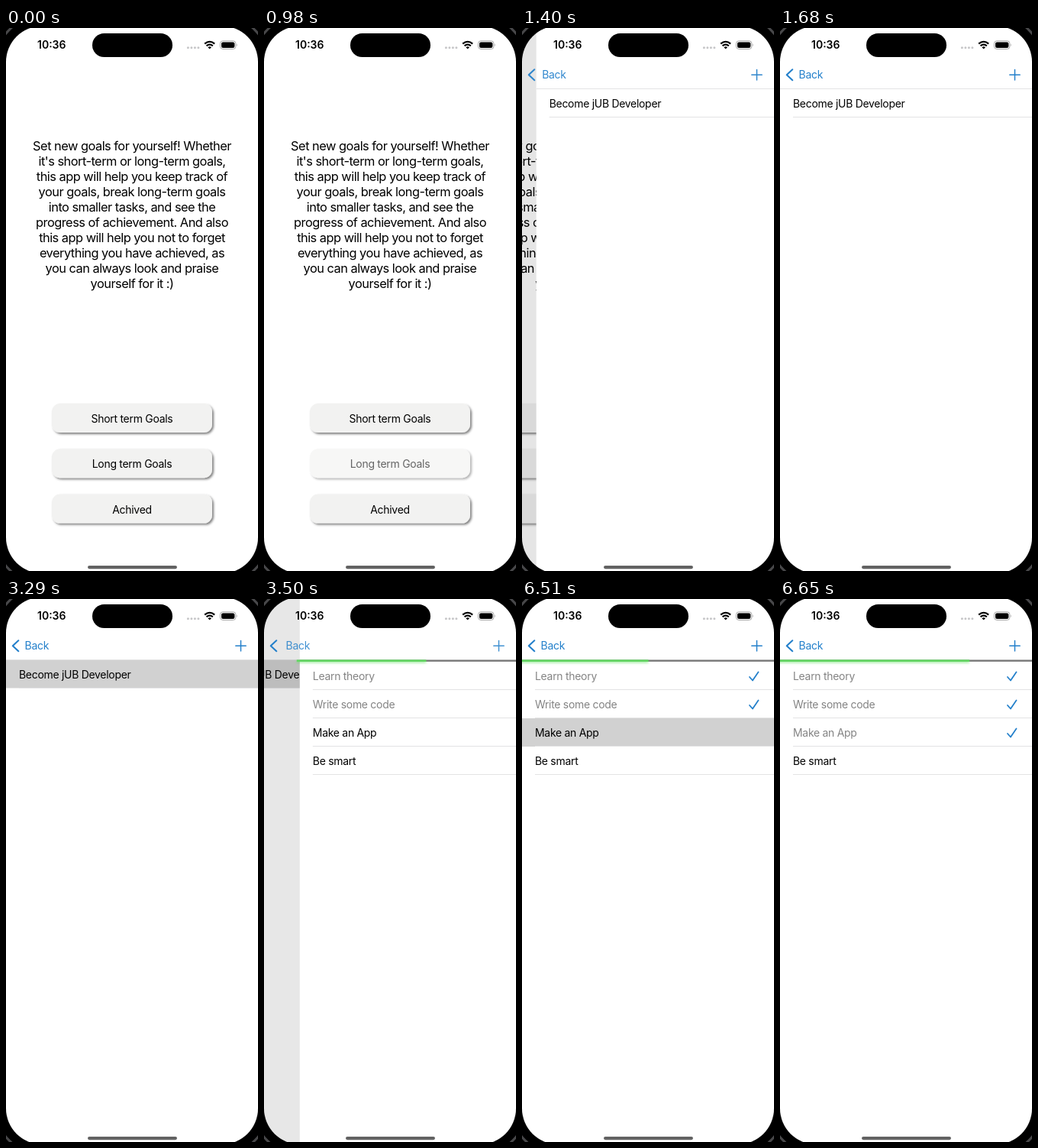
Write an HTML page that moves like this. It is 330 px wide and 710 px high and loops after 8 s.

```html
<!DOCTYPE html>
<html lang="en">
<head>
<meta charset="utf-8">
<title>Goals app</title>
<style>
html, body { margin: 0; width: 100%; height: 100%; overflow: hidden; background: #000; }
svg { display: block; width: 330px; height: 710px; }
text { font: 400 14px Inter, "Liberation Sans", sans-serif; letter-spacing: -0.3px; fill: #000; }
.intro text { font-size: 16.4px; letter-spacing: -0.52px; text-anchor: middle; }
.button text { text-anchor: middle; }
.button rect { fill: #f2f2f1; filter: url(#shadow); }
.clock { font-weight: 600; letter-spacing: 0; }
.done { fill: #848484; }
.back { fill: #2480cb; }
.icon { fill: none; stroke: #2480cb; stroke-linecap: round; stroke-linejoin: round; }
.line { stroke: #e3e3e4; stroke-width: 1; }
.press { fill: #d1d1d1; }
</style>
</head>
<body>
<svg viewBox="0 0 330 710">
  <defs>
    <filter id="shadow" x="-5%" y="-20%" width="110%" height="150%">
      <feDropShadow dx="2" dy="2" stdDeviation="1.7" flood-color="#000" flood-opacity=".5"/>
    </filter>
    <filter id="glow" x="-5%" y="-200%" width="110%" height="600%">
      <feDropShadow dx="0" dy="1.5" stdDeviation="1.5" flood-color="#5fe05f" flood-opacity=".7"/>
    </filter>
    <clipPath id="screen"><rect y="-2.5" width="330" height="715.5" rx="47"/></clipPath>
  </defs>

  <rect width="330" height="710" fill="#000"/>
  <rect x="-13" y="-15.5" width="356" height="741.5" rx="60" fill="none" stroke="#48484a" stroke-width="3"/>

  <g clip-path="url(#screen)">
    <g id="home">
      <rect y="-3" width="330" height="717" fill="#fff"/>
      <g class="intro" id="intro"></g>
      <g id="buttons"></g>
      <rect class="dim" y="-3" width="330" height="717" opacity="0"/>
    </g>

    <g id="goals">
      <rect y="-3" width="330" height="717" fill="#fff"/>
      <rect class="press" id="goalPress" y="79.5" width="330" height="37"/>
      <path class="line" d="M0 79.5H330M17 116.5H330"/>
      <text x="17" y="103.5">Become jUB Developer</text>
      <rect class="dim" y="-3" width="330" height="717" opacity="0"/>
    </g>

    <g id="tasks">
      <rect y="-3" width="330" height="717" fill="#fff"/>
      <rect class="press" id="taskPress" y="156" width="330" height="37"/>
      <g id="rows"></g>
      <rect y="79.5" width="330" height="2.4" fill="#787878"/>
      <rect id="bar" x="-4" y="79.5" height="2.4" fill="#5fd85f" filter="url(#glow)"/>
    </g>

    <path class="icon" id="chevron" d="M16.3 54.3L8.8 61.2L16.3 68.2" stroke-width="2.1"/>
    <g id="nav1"></g>
    <g id="nav2"></g>

    <text class="clock" x="41" y="27.3">10:36</text>
    <rect x="113" y="7" width="105" height="31" rx="15.5"/>
    <g fill="#c6c6c8">
      <circle cx="238.4" cy="25.7" r="1.5"/><circle cx="242.9" cy="25.7" r="1.5"/>
      <circle cx="247.4" cy="25.7" r="1.5"/><circle cx="251.9" cy="25.7" r="1.5"/>
    </g>
    <g fill="none" stroke="#000" stroke-width="2.2">
      <path d="M260.2 20.6Q266.7 15 273.2 20.6"/>
      <path d="M262.6 23.3Q266.7 19.8 270.8 23.3"/>
    </g>
    <path d="M264.4 25.2Q266.7 23.4 269 25.2L266.7 27.6Z"/>
    <rect x="280.5" y="16.9" width="20.4" height="10.6" rx="3.4" fill="none" stroke="#a5a5a5"/>
    <rect x="282" y="18.4" width="17.4" height="7.6" rx="2.2"/>
    <path d="M302 20.5Q303.6 22.2 302 23.9Z" fill="#a5a5a5"/>
    <rect x="107" y="703" width="117" height="4.2" rx="2.1" fill="#626262"/>
  </g>
</svg>

<script>
const $ = id => document.getElementById(id);
const LOOP = 8000, STEP = 70, WIDTH = 330;

$("intro").innerHTML = [
  "Set new goals for yourself! Whether", "it's short-term or long-term goals,",
  "this app will help you keep track of", "your goals, break long-term goals",
  "into smaller tasks, and see the", "progress of achievement. And also",
  "this app will help you not to forget", "everything you have achieved, as",
  "you can always look and praise", "yourself for it :)"
].map((s, i) => `<text x="165" y="${159.7 + 20.05 * i}">${s}</text>`).join("");

$("buttons").innerHTML = ["Short term Goals", "Long term Goals", "Achived"].map((s, i) => {
  const y = 491 + 59.3 * i;
  return `<g class="button"><rect x="60" y="${y}" width="210" height="38" rx="11"/>
    <text x="165" y="${y + 25}">${s}</text></g>`;
}).join("");

$("rows").innerHTML = ["Learn theory", "Write some code", "Make an App", "Be smart"].map((s, i) => {
  const y = 101 + 37 * i;
  return `<text x="17" y="${y + 5}">${s}</text>
    <path class="line" d="M17 ${y + 17.5}H330"/>
    <path class="icon check" d="M298 ${y + 1}L302 ${y + 5.5}L309.5 ${y - 5.5}" stroke-width="1.8"/>`;
}).join("");

for (const id of ["nav1", "nav2"]) {
  $(id).innerHTML = `<text class="back" x="24.6" y="66">Back</text>
    <path class="icon" d="M300.8 61.2H314.2M307.5 54.5V67.9" stroke-width="1.5"/>`;
}

const longButton = $("buttons").children[1];
const labels = $("rows").querySelectorAll("text");
const checks = $("rows").querySelectorAll(".check");

// critically damped spring, settled after 560 ms
function spring(ms) {
  if (ms <= 0) return 0;
  if (ms >= 560) return 1;
  const a = ms * 0.0164;
  return 1 - (1 + a) * Math.exp(-a);
}

function shift(el, x) { el.setAttribute("transform", `translate(${x.toFixed(2)} 0)`); }

function placePage(id, enter, leave) {
  const page = $(id), dim = page.querySelector(".dim");
  shift(page, WIDTH * (1 - enter) - 0.3 * WIDTH * leave);
  if (dim) dim.setAttribute("opacity", 0.109 * leave);
  page.style.display = enter > 0 && leave < 1 ? "" : "none";
}

function placeNav(id, enter, leave) {
  const [label, plus] = $(id).children;
  const alpha = enter * Math.max(0, 1 - 2 * leave);
  shift(label, 28 * (1 - enter) - 24 * leave);
  label.setAttribute("opacity", alpha);
  plus.setAttribute("opacity", alpha);
}

function draw(now) {
  const t = Math.floor((now % LOOP) / STEP) * STEP;
  const p = spring(t - 1120), q = spring(t - 3290);
  const done = t >= 6650 ? 3 : 2;

  placePage("home", 1, p);
  placePage("goals", p, q);
  placePage("tasks", q, 0);
  placeNav("nav1", p, q);
  placeNav("nav2", q, 0);
  $("chevron").setAttribute("opacity", p);

  longButton.setAttribute("opacity", t >= 980 && t < 1190 ? 0.6 : 1);
  $("goalPress").setAttribute("opacity", t >= 3290 ? 1 : 0);
  $("taskPress").setAttribute("opacity", t >= 6510 && t < 6650 ? 1 : 0);
  $("bar").setAttribute("width", 4.5 + WIDTH * done / 4);
  labels.forEach((el, i) => el.classList.toggle("done", i < done));
  checks.forEach((el, i) => el.setAttribute("opacity", i < done ? 1 : 0));
}

function tick() {
  draw(performance.now());
  requestAnimationFrame(tick);
}
tick();
</script>
</body>
</html>
```
